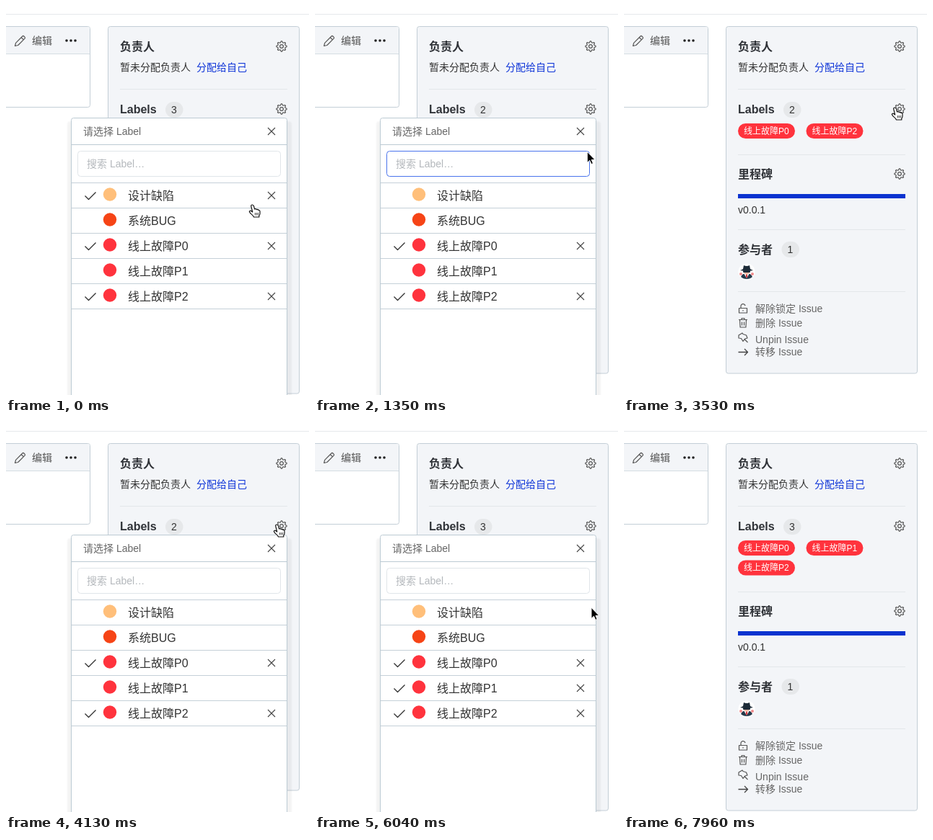
These frames come from a looping animation (420x540 px, 8260 ms). An HTML page:

```html
<!DOCTYPE html>
<html lang="zh-CN">
<head>
<meta charset="utf-8">
<style>
html, body { margin: 0; width: 100%; height: 100%; overflow: hidden; background: #fff; }
svg { display: block; width: 420px; height: 540px; }
text { font-family: "Liberation Sans", "Noto Sans CJK SC", "Noto Sans CJK", sans-serif; }
</style>
</head>
<body>
<svg id="stage" viewBox="0 0 420 540"></svg>
<script>
const LOOP = 8260;
const stage = document.getElementById('stage');

const text = (x, y, s, size = 14, fill = '#333', more = '') =>
  `<text x="${x}" y="${y}" font-size="${size}" fill="${fill}" ${more}>${s}</text>`;
const title = (y, s) => text(158, y, s, 16, '#303338', 'font-weight="bold"');
const rect = (x, y, w, h, r, fill, stroke = 'none', more = '') =>
  `<rect x="${x}" y="${y}" width="${w}" height="${h}" rx="${r}" fill="${fill}" stroke="${stroke}" ${more}/>`;
const circle = (x, y, r, fill) => `<circle cx="${x}" cy="${y}" r="${r}" fill="${fill}"/>`;
const line = (d, stroke = '#555', width = 1.2) =>
  `<path d="${d}" fill="none" stroke="${stroke}" stroke-width="${width}" stroke-linejoin="round"/>`;
const group = (s, attrs) => `<g ${attrs}>${s}</g>`;
const move = (x, y, s) => group(s, `transform="translate(${x} ${y})"`);
const rule = y => line(`M158 ${y}H390`, '#e3e7ea', 1);
const cross = (x, y) => line(`M${x - 5} ${y - 5}l10 10m0-10l-10 10`, '#444', 1.1);
const badge = (x, y, n) =>
  rect(x - 12, y - 11, 24.5, 22, 11, '#e6e8ea') + text(x, y + 5, n, 14, '#333', 'text-anchor="middle"');

const teeth = Array.from({ length: 32 }, (_, i) => {
  const a = (i - 0.5) * Math.PI / 16, r = i % 4 < 2 ? 7.1 : 5.4;
  return (r * Math.cos(a)).toFixed(2) + ' ' + (r * Math.sin(a)).toFixed(2);
}).join('L');
const gear = y => move(382, y, line(`M${teeth}z`) +
  '<circle r="2.4" fill="none" stroke="#555" stroke-width="1.2"/>');

const HAND = '<path d="M-2.3 1.8Q-2.2-.2-.6 0T1.5 1.8L2.6 6Q4-.1+5 5.2 5.6 6.6Q7.2 5.8 8 7.4Q9.7 7 10 9V12Q10 13.6 8.8 15.2V17H1.5Q.9 15.2-1.4 13.4T-4.6 9.4Q-4.2 7.4-1.8 8.8L-.3 10z" fill="#fff" stroke="#111" stroke-width="1.2" stroke-linejoin="round"/><path d="M3.4 11v3.4M5.4 11v3.4M7.4 11v3.4" stroke="#111" stroke-width=".8"/>'
  .replace('Q4-.1+5 5.2 5.6 6.6', 'Q4.2 5.2 5.6 6.6');
const ARROW = '<path d="M0 0V15.2L3.5 12L5.8 17.2L8.2 16.2L6 11.2H10.8z" fill="#000" stroke="#fff"/>';

const labels = [
  ['设计缺陷', '#ffbf7a'], ['系统BUG', '#f64416'],
  ['线上故障P0', '#ff333d'], ['线上故障P1', '#ff333d'], ['线上故障P2', '#ff333d']
];

const card =
  line('M0 11.5H420', '#e6e9ec', 1) +
  rect(-9.5, 28.5, 126, 112, 3, '#fff', '#c3ced6') +
  rect(-9, 29, 125, 37, 2, '#f3f5f8') + line('M0 66.5H116', '#d5dde3', 1) +
  line('M12.5 55.5l1-4.2 9.3-9.3q1-1 2 0l1.2 1.2q1 1 0 2l-9.3 9.3zM21 43.5l3.4 3.4') +
  text(36, 53, '编辑', 14, '#555') +
  [84, 90, 96].map(x => circle(x, 48, 1.8, '#222')).join('');

const avatar = move(170, 369,
  circle(0, 0, 11.5, '#fff') +
  '<path d="M-8 7Q-6 2 0 2T8 7Q5 10 0 10T-8 7z" fill="#24394a"/>' +
  '<path d="M-4 2L0 9L4 2z" fill="#fff"/><path d="M-1 3H1L1.2 8H-1.2z" fill="#d33a40"/>' +
  '<path d="M-4.5-2H4.5Q4.5 3 0 4Q-4.5 3-4.5-2z" fill="#f1b9a4"/>' +
  rect(-5, -2, 10, 3, 1, '#1d2b38') +
  '<path d="M-9-2Q-5-4-5-4L-4-9Q0-7 4-9L5-4Q5-4 9-2Q0 0-9-2z" fill="#1d2b38"/>' +
  circle(-8, 3, 2, '#ef8a8c') + circle(8, 3, 2, '#ef8a8c'));

const details =
  rule(206.5) + title(239, '里程碑') + gear(233) +
  rect(158, 261, 232, 6, 0, '#0a33d0') + text(158, 288, 'v0.0.1') +
  rule(310.5) + title(343.5, '参与者') + badge(230.5, 338, 1) + avatar + rule(396.5) +
  line('M159.5 419.5h11v6.5h-11zM162 419.5v-2.5a3 3 0 0 1 6-.8M165 422v1.5') +
  line('M159 435.5h12M163 435.5v-2h4v2M160.5 435.5l.6 10.5h7.8l.6-10.5M163.5 438.5v5M166.5 438.5v5') +
  line('M159 457l5-3 1 1.5 4.5 1.5 1.5 4-3.5 1-2.5 3.5-2.5-4-3.5-.5zM167 462.500l4.500 4.500') +
  line('M158.500 480.500H171.500M167 476l4.500 4.500-4.500 4.500', '#444', 1.3) +
  text(182, 425, '解除锁定 Issue', 14, '#666') + text(182, 445, '删除 Issue', 14, '#666') +
  text(182, 467.5, 'Unpin Issue', 14, '#666') + text(182, 485, '转移 Issue', 14, '#666');

function sidebar(picked) {
  const dy = picked.length > 2 ? 28 : 0;
  const pills = picked.map((id, i) => move(158 + i % 2 * 94.5, 163 + (i >> 1) * 27.5,
    rect(0, 0, 79, 21, 10.5, '#ff333d') + text(8, 14.8, labels[id][0], 12, '#fff'))).join('');
  return rect(141.5, 28.5, 265, 481.5 + dy, 3, '#f3f5f8', '#c3ced6') +
    title(61.5, '负责人') + gear(56) + text(158, 90, '暂未分配负责人') +
    text(264, 90, '分配给自己', 14, '#1036d8') + rule(115.5) +
    title(149, 'Labels') + badge(233, 144, picked.length) + gear(143) +
    pills + move(0, dy, details);
}

const loader =
  line('M240.500 370C233 361 229 354.500 220.500 354.500A15.500 15.500 0 0 0 220.500 385.500' +
    'C229 385.500 233 379 240.500 370S252 354.500 260.500 354.500A15.500 15.500 0 0 1 260.500 385.500' +
    'C252 385.500 248 379 240.500 370', '#dbe0e4', 8) + circle(204, 371.5, 4, '#2158f0');

function modal(picked, loading, hover) {
  const rows = labels.map(([name, color], i) => {
    const on = picked.includes(i);
    return move(0, i * 35,
      (on ? line('M109.500 263.500l5 5 10-10', '#333', 1.4) + cross(368, 263) : '') +
      circle(144, 261.5, 9.2, color) + text(169, 268.5, name, 16) +
      line('M91 280.500H389', '#c5d0d8', 1));
  }).join('');
  const body = rect(99.5, 201.5, 281, 35, 4, '#fff', hover ? '#4a74ec' : '#e0e5e9') +
    text(112, 224, '搜索 Label…', 14, '#b4b8bc') + line('M91 245.500H389', '#c5d0d8', 1) + rows;
  return rect(85, 160, 311, 400, 4, '#000', 'none', 'opacity=".045" style="filter:blur(1px)"') +
    rect(90.5, 155.5, 299, 400, 3, '#fff', '#bccad3') +
    text(107, 179, '请选择 Label', 14, '#666') + cross(368, 174) +
    line('M91 192.500H389', '#bccad3', 1) +
    (loading ? group(body, 'opacity=".5" style="filter:blur(1px)"') + loader : body);
}

// Cursor trips: first step, last step, number of steps, cubic control points
const trips = [
  [150, 450, 3, [342, 276], [350, 274], [362, 266], [369, 260]],
  [1200, 2200, 8, [369, 260], [375, 180], [410, 100], [366, 167]],
  [3390, 3530, 2, [366, 167], [369, 158], [373, 149], [376, 141]],
  [4270, 4860, 5, [376, 141], [390, 220], [355, 330], [323, 369]],
  [5600, 6480, 7, [323, 369], [385, 330], [398, 215], [371, 177]],
  [6930, 7810, 7, [371, 177], [420, 270], [440, 430], [381, 537]]
];
const handTimes = [[0, 750], [2350, 2800], [3530, 4270], [4570, 5900], [6480, 6930]];
const within = (t, a, b) => t >= a && t < b;

function cursorAt(t) {
  const [a, b, n, p, q, r, s] = trips.filter(m => t >= m[0]).pop() || trips[0];
  const step = t < a ? 0 : Math.floor((t - a) / (b - a) * (n - 1) + 0.03) + 1;
  const u = Math.min(1, step / n), v = 1 - u;
  return [0, 1].map(i => v * v * v * p[i] + 3 * v * v * u * q[i] + 3 * v * u * u * r[i] + u * u * u * s[i]);
}

function modalOpacity(t) {
  const fades = [[0, 1], [2650, .87], [2800, .35], [2940, 0], [3830, .15], [3980, .75], [4120, 1],
    [6780, .87], [6930, .35], [7070, 0]];
  return fades.filter(f => t >= f[0]).pop()[1];
}

function scene(t) {
  const picked = t < 900 ? [0, 2, 4] : t < 5300 ? [2, 4] : t < 7070 ? [2, 4, 3] : [2, 3, 4];
  const loading = within(t, 750, 900) || within(t, 5150, 5300);
  const [x, y] = cursorAt(t);
  const alpha = modalOpacity(t);
  const hover = x < 381 && within(y, 201, 237);
  const hand = handTimes.some(([a, b]) => within(t, a, b));
  return card + sidebar(picked) +
    (alpha ? group(modal(picked, loading, hover),
      `opacity="${alpha}" transform="translate(0 ${alpha < 1 ? -1 : 0})"`) : '') +
    (t < 7960 ? move(x.toFixed(1), y.toFixed(1), hand ? HAND : ARROW) : '');
}

let shown = '';
function draw() {
  const next = scene(performance.now() % LOOP);
  if (next !== shown) stage.innerHTML = shown = next;
  requestAnimationFrame(draw);
}
draw();
</script>
</body>
</html>
```
